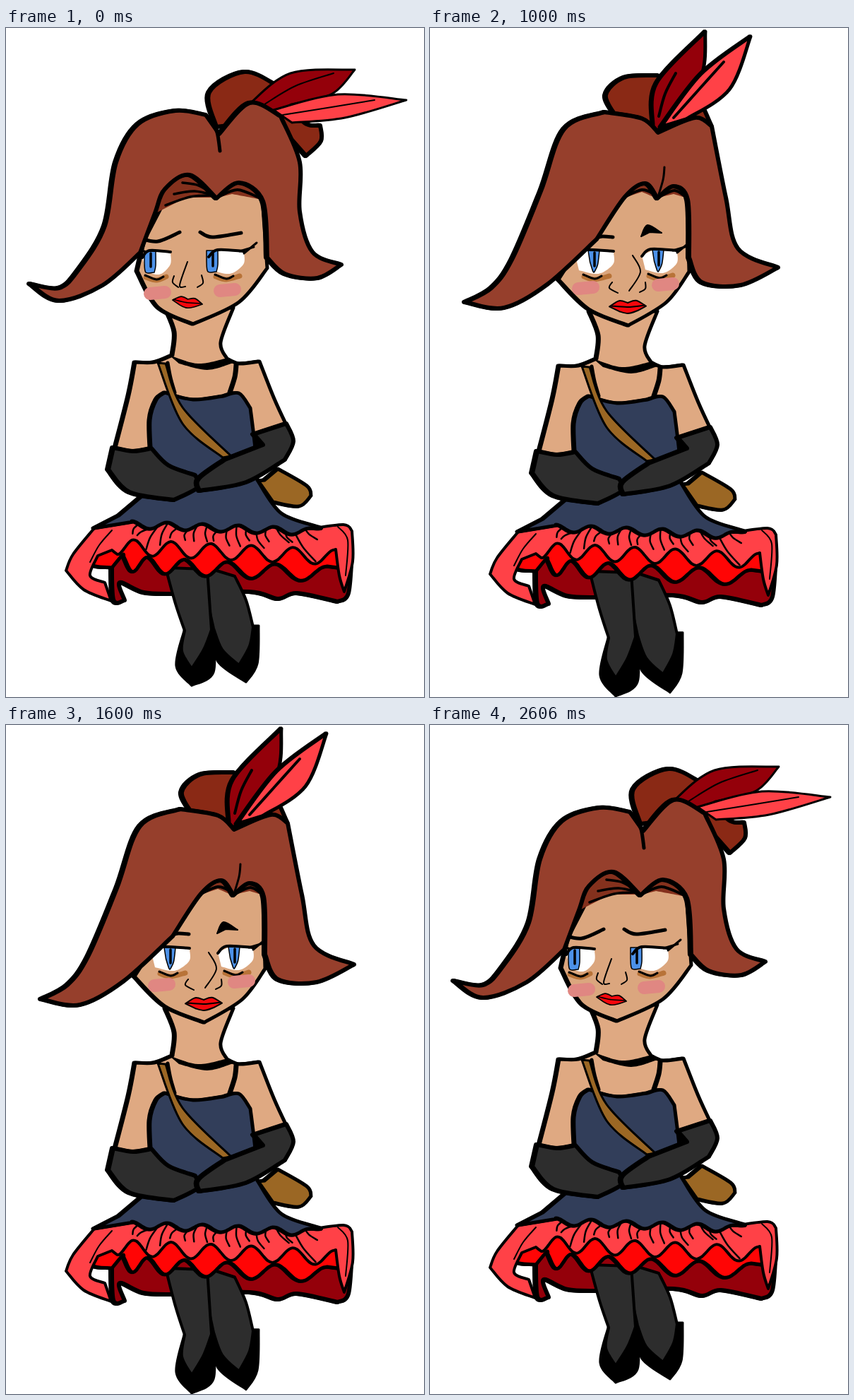
These frames come from a looping animation (592 by 947 pixels, 3.01 s). An HTML page:

```html
<!DOCTYPE html>
<html lang="en">
<head>
<meta charset="utf-8">
<title>Worried dancer</title>
<style>
html, body { margin: 0; width: 100%; height: 100%; overflow: hidden; background: #fff; }
svg { display: block; width: 592px; height: 947px; }
path { stroke-linejoin: round; stroke-linecap: round; }
#side { animation: side 3010ms step-end infinite; }
#front { animation: front 3010ms step-end infinite; }
@keyframes side {
  0% { visibility: visible; }
  33.2226% { visibility: hidden; }
  66.4452%, 100% { visibility: visible; }
}
@keyframes front {
  0% { visibility: hidden; }
  33.2226% { visibility: visible; }
  66.4452%, 100% { visibility: hidden; }
}
</style>
</head>
<body>
<svg viewBox="0 0 592 947">
  <g id="side"></g>
  <g id="front"></g>
</svg>
<script>
const C = {
  skin: '#dfa982', face: '#dba67e', hair: '#963f2c', bun: '#8a2915', under: '#84311d',
  navy: '#323e5a', dark: '#2d2d2d', wine: '#94000a', red: '#ff0505', coral: '#ff4147',
  bag: '#9b6724', blue: '#4c91e8', blush: '#e08782', tired: '#b87338'
};
const HEAVY = 5; // outlines this wide get extra ink on their left side

let layer;

function make(tag, attrs) {
  const node = document.createElementNS('http://www.w3.org/2000/svg', tag);
  for (const key in attrs) node.setAttribute(key, attrs[key]);
  layer.append(node);
  return node;
}

function group(transform, paint) {
  const outer = layer;
  layer = make('g', { transform });
  paint();
  layer = outer;
}

// Smooth curve through the points; "/" leaves a sharp corner at the point before it.
function curve(text) {
  let d = '', last;
  for (const part of text.split('/')) {
    const p = part.trim().split(/\s+/).map(s => s.split(',').map(Number));
    if (last) p.unshift(last); else d = 'M' + p[0];
    for (let i = 0; i < p.length - 1; i++) {
      const a = p[i - 1] || p[i], b = p[i], c = p[i + 1], e = p[i + 2] || c;
      const h1 = b.map((v, k) => (v + (c[k] - a[k]) / 6).toFixed(1));
      const h2 = c.map((v, k) => (v - (e[k] - b[k]) / 6).toFixed(1));
      d += `C${h1} ${h2} ${c}`;
    }
    last = p[p.length - 1];
  }
  return d;
}

function shape(text, fill, width = 0) {
  const d = curve(text) + 'Z';
  const ink = { d, stroke: '#000', 'stroke-width': width };
  if (width >= HEAVY) make('path', { ...ink, transform: 'translate(-2 0)' });
  make('path', width ? { ...ink, fill } : { d, fill });
}

function line(text, width = 3, stroke = '#000') {
  make('path', { d: curve(text), fill: 'none', stroke, 'stroke-width': width });
}

const mix = (a, b, t) => a + (b - a) * t;

// Wavy hem from x0 to x1; a power above 1 widens the waves to the right.
const hem = (x0, x1, y0, y1, amp, waves, power = 1) => t =>
  [mix(x0, x1, t ** power), mix(y0, y1, t) + amp * Math.cos(2 * Math.PI * waves * t)];

function trace(f, steps = 48) {
  return Array.from({ length: steps + 1 }, (_, i) => f(i / steps).map(v => v.toFixed(1))).join(' ');
}

function random(seed) {
  return () => (seed = seed * 16807 % 2147483647) / 2147483647;
}

// Strokes that spread from one tip to points between a and b.
function fan([x, y], a, b, count) {
  for (let i = 0; i < count; i++) {
    const t = i / (count - 1), ex = mix(a[0], b[0], t), ey = mix(a[1], b[1], t);
    line(`${x},${y} ${(x + ex) / 2},${(y + ey) / 2 - 5} ${ex},${ey}`, 3.5);
  }
}

const waist = hem(178, 430, 703, 713, -5, 5);
const frill = hem(158, 467, 734, 749, 11, 5.5, 1.08);
const lining = hem(165, 455, 757, 773, -11, 5, 1.3);

function petticoat() {
  shape('150,745 / 152,809 168,810 / 161,785 195,799 235,801 / 345,798 385,808 412,800 470,812 / 485,800 490,740 / 300,720', C.wine, 6);
}

function leg(stocking, shoe) {
  shape(shoe, '#000', 3);
  shape(stocking, C.dark, 4);
}

function legs() {
  leg('285,764 / 286,810 294,850 / 306,880 330,902 / 345,875 350,848 / 340,810 324,776',
    '293,855 / 300,897 340,926 / 356,900 358,846 / 349,846');
  leg('226,764 / 240,815 253,853 / 249,882 263,907 / 280,880 291,852 / 285,766',
    '252,853 / 241,903 263,931 / 294,912 293,850');
}

function ruffles() {
  shape(`125,715 / 118,757 150,764 / ${trace(lining)} / 478,765 / 478,710`, C.red, 5);
  shape(`125,708 / 95,745 85,768 / 110,795 149,811 / 140,785 / 119,775 130,747 / 150,739 / ${trace(frill)} / 472,775 479,798 / 491,755 490,712 / 478,703 430,709 / 300,690 180,698`, C.coral, 4);
  const rnd = random(11);
  for (let t = 0.04; t < 1; t += 0.055) {
    const [x, y] = waist(t), [fx, fy] = frill(t), long = mix(0.4, 1, rnd());
    const ex = mix(x, fx, long) + 10 * rnd() - 5, ey = mix(y, fy, long);
    line(`${x},${y} ${(x + ex) / 2 - 3},${(y + ey) / 2} ${ex},${ey}`, 2.5);
  }
  line('150,711 132,732 119,756', 2);
  line('470,706 484,725 481,775', 2);
}

function torso() {
  shape('226,396 / 239,430 236,463 / 210,473 183,473 / 174,520 154,598 / 206,600 / 350,590 / 399,566 / 380,525 359,472 / 330,475 313,468 / 304,445 322,396', C.skin, 5);
  shape('366,640 / 385,624 / 426,648 432,662 / 415,677 378,671 / 357,641', C.bag, 5);
  shape(`125,708 / 180,699 / ${trace(waist)} / 445,707 390,687 356,640 / 353,595 346,538 / 330,517 308,521 / 265,526 225,516 / 213,526 204,555 206,610 / 192,663 / 160,690`, C.navy, 5);
  line('326,477 324,494 317,516', 7);
  line('229,474 233,495 239,516', 5);
  shape('215,474 / 226,475 / 250,537 319,606 / 307,608 / 250,560 215,474', C.bag, 3);
  shape('231,463 / 272,475 314,467 / 322,474 / 285,484 245,475', '#000');
  shape('152,594 180,599 206,595 / 230,619 268,633 / 272,650 238,668 / 175,657 145,625', C.dark, 6);
  shape('351,575 397,560 / 407,585 395,611 / 340,643 274,655 / 273,638 310,611 / 364,590', C.dark, 6);
}

// Eye with iris, tired skin below and lashes flicking to one side.
function eye(x, y, rx, look, taper, flick, blushX, blushY) {
  group(`translate(${x} ${y})`, () => {
    line(`-15,21 0,25 ${rx - 6},20`, 7, C.tired);
    line(`-16,18 0,24 10,20`, 3);
    line(`${blushX - 10},${blushY + 1} ${blushX + 11},${blushY - 1}`, 18, C.blush);
    shape(`${-rx},-8 / 0,-18 ${rx},-13 / ${rx},2 ${rx / 2},14 0,17 ${-rx + 5},12`, '#fff');
    shape(`${look - 8},-16 ${look + 8},-16 / ${look + 8 - taper / 2},4 ${look + 6 - taper},14 / ${look - 6 + taper},14 ${look - 8 + taper / 2},0`, C.blue, 1.5);
    line(`${look + 1},-13 ${look + 1},6`, 3.5);
    line(`${-rx},-7 ${-rx / 2},-17 ${rx},-15`, 4);
    const ex = flick * rx;
    line(`${ex},-12 ${ex + flick * 18},-27`, 3);
    line(`${ex - flick * 6},-15 ${ex + flick * 14},-21`, 3);
  });
}

function lips(x, y, size, tilt) {
  group(`translate(${x} ${y}) rotate(${tilt}) scale(${size})`, () => {
    shape('-26,0 / -12,-8 0,-5 / 12,-8 26,0 / 12,7 0,10 -12,7', '#f5070c', 2);
    line('-24,-1 0,1 24,-1', 2);
  });
}

function feather(outline, vein, fill, width) {
  shape(outline, fill, width);
  line(vein, width - 1);
}

function sideHead() {
  shape('298,140 / 288,91 338,62 385,82 / 420,132 445,138 / 446,160 425,181 / 380,130', C.bun, 6);
  feather('343,109 / 403,64 494,59 / 462,93 404,108 / 380,120', '366,108 410,82 464,64', C.wine, 3);
  feather('379,116 / 470,94 567,102 / 480,127 405,134', '392,123 455,113 522,102', C.coral, 3);
  shape('222,250 / 270,225 362,225 / 370,340 / 330,388 265,419 / 215,395 186,344 / 196,300', C.face, 5);
  shape('212,262 / 226,225 260,200 300,240 / 255,240', C.under);
  shape('300,240 / 340,205 363,243 / 320,235', C.under);
  fan([296, 237], [226, 251], [250, 219], 3);
  line('303,238 328,229 358,240', 4);
  eye(213, 332, 20, -9, 0, -1, 1, 43);
  eye(312, 331, 25, -20, 0, 1, 1, 40);
  line('191,298 215,302 246,289', 5);
  line('275,289 292,296 333,290', 5);
  line('257,331 246,364 254,366', 2);
  line('238,351 236,360 244,367', 2);
  line('277,350 279,361 271,367', 2);
  lips(257, 388, 0.82, 8);
  shape('302,150 / 283,123 / 240,117 187,136 156,190 140,280 103,342 75,368 34,362 / 75,386 137,364 190,318 / 211,262 225,228 260,208 298,241 / 330,219 364,245 370,325 / 395,348 441,354 475,335 / 434,317 416,260 416,190 389,125 / 345,106 302,150', C.hair, 6);
  line('303,174 299,148 290,130', 5);
}

function frontHead() {
  shape('264,126 / 249,95 275,70 322,67 / 370,85 398,137 / 330,150', C.bun, 6);
  feather('316,139 / 321,78 390,5 / 382,74 322,146', '324,125 333,93 348,64', C.wine, 5);
  feather('327,140 / 384,65 454,12 / 424,87 363,129', '345,127 380,88 416,48', C.coral, 5);
  shape('272,235 / 320,220 364,235 / 367,345 / 335,388 281,421 / 225,398 182,356 / 205,320', C.face, 5);
  shape('270,242 / 300,210 321,241 / 300,232', C.under);
  shape('323,240 / 345,212 365,241 / 345,235', C.under);
  line('274,240 300,229 319,236', 4);
  line('325,239 346,230 362,239', 4);
  eye(233, 331, 27, -1, 5, -1, -13, 37);
  eye(325, 330, 25, -2, 5, 1, 8, 33);
  line('232,298 244,295 259,296', 5);
  shape('299,295 / 308,279 328,290 / 311,289', '#000', 2);
  line('287,322 298,345 282,372', 2);
  line('258,360 254,368 266,375', 2);
  line('305,360 305,369 297,374', 2);
  lips(280, 394, 1, -1);
  shape('323,148 / 300,128 247,119 / 190,143 157,231 116,328 87,368 50,388 / 105,396 166,363 236,299 / 276,239 305,220 322,241 / 345,224 365,243 367,325 / 385,360 440,364 493,339 / 436,312 419,240 399,139 / 375,127 323,148', C.hair, 6);
  line('332,197 330,215 322,242', 3);
}

function pose(id, drop, stretch, head) {
  layer = document.getElementById(id);
  const body = `translate(0 ${drop})`;
  group(body, petticoat);
  group(`translate(0 ${drop + 766 * (1 - stretch)}) scale(1 ${stretch})`, legs);
  group(body, () => { ruffles(); torso(); });
  head();
}

pose('side', 0, 1, sideHead);
pose('front', 5, 1.06, frontHead);
</script>
</body>
</html>
```
